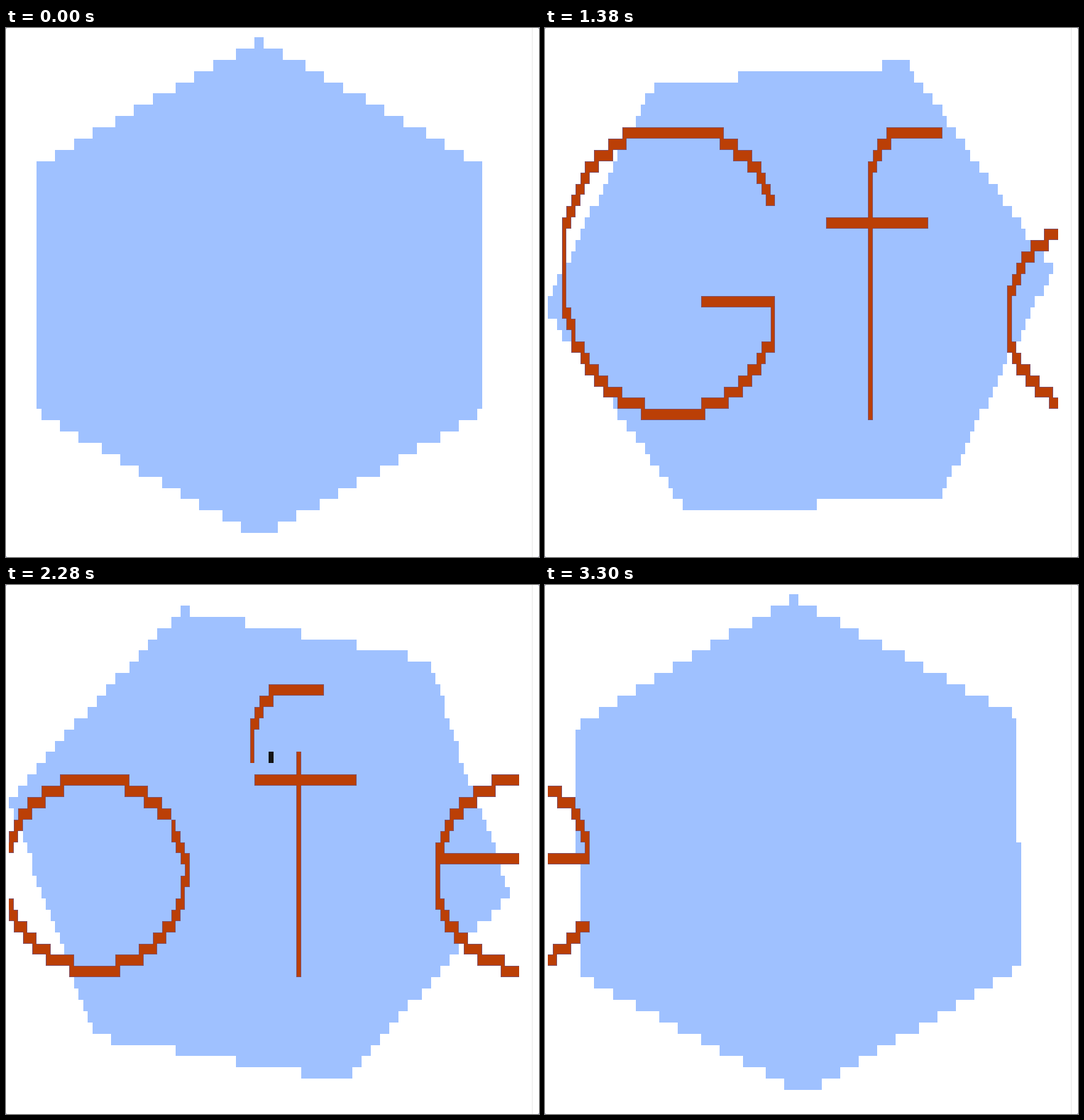
Animation of 751 by 746 pixels, one loop 3.32 s. Source, as an HTML page with a canvas:

```html
<!DOCTYPE html>
<html lang="en">
<head>
<meta charset="utf-8">
<title>Scrolling letters over a turning hexagon</title>
<style>
  html, body { margin: 0; width: 751px; height: 746px; overflow: hidden; background: #fff; }
  canvas { display: block; }
</style>
</head>
<body>
<canvas id="stage" width="751" height="746" role="img" aria-label="PGfofe"></canvas>
<script>
const ctx = document.getElementById('stage').getContext('2d');

const LOOP = 3320, TICK = 20;
const COLS = 110, ROWS = 45, CELLS = COLS * ROWS;
const HEX = '#9fc1ff', INK = '#bb3f06', RIM = '#835066', CURSOR = '#141414';

const colX = c => Math.round(4 + c * 6.536);
const rowY = r => Math.round(13 + r * 15.89);

function fillCells(r, c0, c1, color) {
  c0 = Math.max(c0, 0);
  c1 = Math.min(c1, COLS);
  if (c1 <= c0) return;
  ctx.fillStyle = color;
  ctx.fillRect(colX(c0), rowY(r), colX(c1) - colX(c0), rowY(r + 1) - rowY(r));
}

// Single-stroke letters: advance width, then strokes as x,y points.
const bowl = '8,14 6,13 4,11 3,8 3,6 4,3 6,1 8,0 11,0 13,1 15,3';
const glyphs = {
  P: [21, '4,0 4,21 13,21 16,20 17,19 18,17 18,14 17,12 16,11 13,10 4,10'],
  G: [20, '18,16 17,18 15,20 13,21 9,21 7,20 5,18 4,16 3,13 3,8 4,5 5,3 7,1 9,0 13,0 15,1 17,3 18,5 18,8 13,8'],
  f: [12, '10,21 8,21 6,20 5,17 5,0', '2,14 9,14'],
  o: [19, bowl + ' 16,6 16,8 15,11 13,13 11,14 8,14'],
  e: [18, '3,8 15,8 15,10 14,12 13,13 11,14 ' + bowl]
};

// Ink columns of the whole word, one set per row.
const ink = Array.from({ length: ROWS }, () => new Set());
const hasInk = (r, c) => ink[r].has(c);

function plot(x0, y0, x1, y1, left) {
  const steps = 120;
  for (let i = 0; i <= steps; i++) {
    const x = x0 + (x1 - x0) * i / steps;
    const y = y0 + (y1 - y0) * i / steps;
    const row = Math.floor(33.1 - y * 25 / 21 + 1e-6);
    ink[row].add(Math.floor(left + x * 3 + 1e-6));
  }
}

let pen = -9;
for (const ch of 'PGfofe') {
  const [advance, ...strokes] = glyphs[ch];
  for (const stroke of strokes) {
    const pts = stroke.split(' ').map(p => p.split(',').map(Number));
    for (let i = 1; i < pts.length; i++) plot(...pts[i - 1], ...pts[i], pen);
  }
  pen += advance * 3;
}

// An ink cell has a thin rim wherever it does not touch another one.
function inkCell(r, c, shift) {
  const col = c + shift;
  fillCells(r, col, col + 1, RIM);
  const x0 = colX(col) + !hasInk(r, c - 1), x1 = colX(col + 1) - !hasInk(r, c + 1);
  const y0 = rowY(r) + !hasInk(r - 1, c), y1 = rowY(r + 1) - !hasInk(r + 1, c);
  ctx.fillStyle = INK;
  ctx.fillRect(x0, y0, x1 - x0, y1 - y0);
}

// Left and right crossing of the hexagon with a row at a given step.
function hexSpan(r, step) {
  const corners = Array.from({ length: 6 }, (_, i) => {
    const a = (step * 1.5 + i * 60) * Math.PI / 180;
    return [54 + 55.43 * Math.sin(a), 21.85 - 22.2 * Math.cos(a)];
  });
  let lo = Infinity, hi = -Infinity;
  corners.forEach(([x0, y0], i) => {
    const [x1, y1] = corners[(i + 1) % 6];
    if ((y0 <= r) === (y1 <= r)) return;
    const x = x0 + (x1 - x0) * (r - y0) / (y1 - y0);
    lo = Math.min(lo, x);
    hi = Math.max(hi, x);
  });
  return [Math.ceil(lo), Math.floor(hi)];
}

function paintRow(r, step, c0, c1) {
  if (c1 <= c0) return;
  const [lo, hi] = hexSpan(r, step);
  fillCells(r, Math.max(lo, c0), Math.min(hi, c1), HEX);
  const shift = COLS - step * 10;
  for (const c of ink[r]) {
    if (c + shift >= c0 && c + shift < c1) inkCell(r, c, shift);
  }
}

// Time against number of finished redraws; each redraw runs from top to bottom.
const pace = [
  [0, 1], [600, 8], [940, 12 + 489.5 / CELLS], [1380, 18],
  [1940, 24], [2620, 32 + 3192.5 / CELLS], [3300, 40]
];

function redraws(t) {
  const i = pace.findIndex(p => p[0] >= t);
  if (i < 1) return pace[0][1];
  const [t0, u0] = pace[i - 1], [t1, u1] = pace[i];
  return t === t1 ? u1 : u0 + (u1 - u0) * (t - t0) / (t1 - t0);
}

function paintWindow() {
  ctx.fillStyle = '#fff';
  ctx.fillRect(0, 0, 751, 746);
  ctx.fillStyle = '#ebebeb';
  ctx.fillRect(741, 0, 1, 746);
  ctx.fillStyle = '#a9a9d6';
  for (const x of [0, 750]) for (const y of [0, 745]) ctx.fillRect(x, y, 1, 1);
}

function draw(t) {
  const u = redraws(t);
  const next = Math.floor(u);
  const done = Math.floor((u - next) * CELLS);
  const row = Math.floor(done / COLS), col = done % COLS;
  paintWindow();
  for (let r = 0; r < ROWS; r++) {
    const split = r < row ? COLS : r > row ? 0 : col;
    paintRow(r, next, 0, split);
    paintRow(r, next - 1, split, COLS);
  }
  if (done > 0) fillCells(row, col, col + 1, CURSOR);
}

const start = performance.now();
let last = -1;
function frame() {
  const t = Math.floor(((performance.now() - start) % LOOP) / TICK) * TICK;
  if (t !== last) draw(last = t);
  requestAnimationFrame(frame);
}
frame();
</script>
</body>
</html>
```
